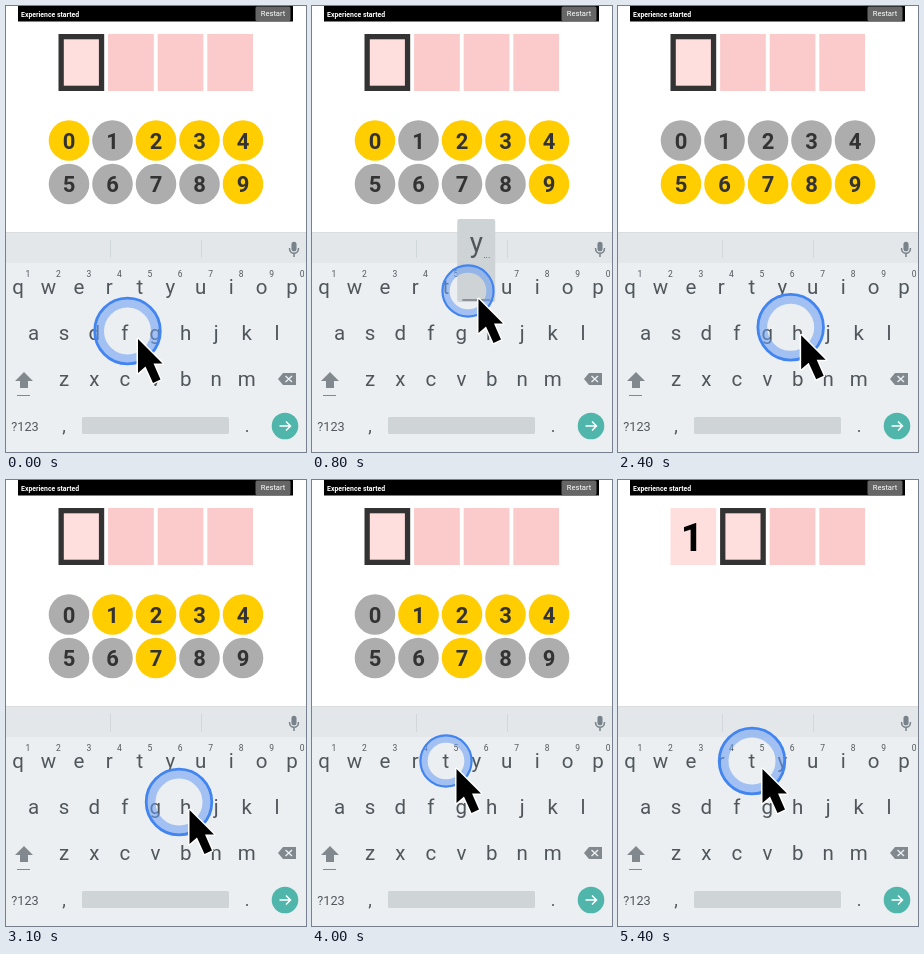
Recreate the animation shown at these times as an HTML page. Size 300x446 px, loop 7500 ms.

```html
<!DOCTYPE html>
<html lang="en">
<head>
<meta charset="utf-8">
<title>PIN entry</title>
<style>
html, body { margin: 0; width: 100%; height: 100%; overflow: hidden; background: #fff; }
svg { display: block; width: 100vw; height: 100vh; }
text { font-family: Roboto, sans-serif; }
.keys text, #popup text { fill: #50575c; }
</style>
</head>
<body>
<svg id="stage" viewBox="0 0 300 446">
  <rect x="12" width="275" height="15.500"/>
  <text x="15" y="10.700" font-size="6.900" font-weight="700" fill="#fff">Experience started</text>
  <rect x="249.500" y="0.500" width="35" height="14.500" rx="1.500" fill="#666"/>
  <text x="267" y="10.400" font-size="7.600" text-anchor="middle" fill="#fff">Restart</text>

  <g id="cells"></g>
  <text id="entered" x="74" y="70.500" font-size="39.500" font-weight="700" text-anchor="middle">1</text>
  <g id="digits"></g>

  <rect y="226" width="300" height="220" fill="#eceff1"/>
  <rect y="226" width="300" height="31" fill="#e4e7ea"/>
  <path d="M0 226.500H300" stroke="#dadde0"/>
  <path d="M104.500 234V252M195.500 234V252" stroke="#d2d7da"/>
  <g fill="none" stroke="#78828a" stroke-width="1.500">
    <rect x="286.200" y="236.500" width="3.600" height="8" rx="1.800" fill="#78828a"/>
    <path d="M283.500 242C283.500 249 292.500 249 292.500 242M288 247V251"/>
  </g>
  <g class="keys" id="keys" text-anchor="middle"></g>
  <path d="M18 366L27 375H22V382H14V375H9Z" fill="#81898e"/>
  <path d="M11 389.500H24" stroke="#81898e"/>
  <path d="M272 373L277 367H290V379H277Z" fill="#81898e"/>
  <path d="M279.500 370L286 376M286 370L279.500 376" stroke="#eceff1" stroke-width="1.400"/>
  <rect x="76" y="411" width="147" height="17" rx="1.500" fill="#cfd4d7"/>
  <circle cx="279" cy="420" r="13.300" fill="#50b5aa"/>
  <path d="M273.500 420H284.500M280 415.500L284.500 420L280 424.500" fill="none" stroke="#fff" stroke-width="1.500"/>

  <g id="popup">
    <rect x="-19" y="-75" width="38" height="83" rx="2" fill="#ced3d6"/>
    <path d="M-14 6H14" stroke="#777d81" stroke-width="1.500"/>
    <text id="popupKey" y="-42" font-size="28" text-anchor="middle"></text>
    <text x="7" y="-36" font-size="9">...</text>
  </g>

  <g id="pointer">
    <g id="ring" fill="none">
      <circle r="28" stroke="#669df5" stroke-opacity=".55" stroke-width="9"/>
      <circle r="32.800" stroke="#4285f0" stroke-width="2.800"/>
    </g>
    <path d="M10.500 8V42L18 35.500L25.500 52L33 48.500L26 32.500H35Z" stroke="#fff"
      stroke-width="3" stroke-linejoin="round" paint-order="stroke"/>
  </g>
</svg>
<script>
const LOOP = 7500, FRAME = 100;
const byId = id => document.getElementById(id);

function add(parent, tag, attributes, content = '') {
  const node = document.createElementNS('http://www.w3.org/2000/svg', tag);
  for (const name in attributes) node.setAttribute(name, attributes[name]);
  node.textContent = content;
  parent.append(node);
  return node;
}

const keyPlaces = {};
function addKeyRow(letters, x, y) {
  [...letters].forEach((letter, i) => {
    const place = { x: x + i * 30.45, y };
    keyPlaces[letter] = place;
    add(byId('keys'), 'text', { ...place, 'font-size': 20.5 }, letter);
  });
}
addKeyRow('qwertyuiop', 12, 288);
addKeyRow('asdfghjkl', 27.5, 334);
addKeyRow('zxcvbnm', 58, 380);
[...'1234567890'].forEach((digit, i) =>
  add(byId('keys'), 'text', { x: 22 + i * 30.45, y: 271, 'font-size': 8.5 }, digit));
add(byId('keys'), 'text', { x: 19, y: 424.5, 'font-size': 12.7 }, '?123');
add(byId('keys'), 'text', { x: 58, y: 426, 'font-size': 18 }, ',');
add(byId('keys'), 'text', { x: 241, y: 426, 'font-size': 18 }, '.');

const cells = [0, 1, 2, 3].map(() => add(byId('cells'), 'rect', { stroke: '#333' }));

const discs = Array.from({ length: 10 }, (_, i) => {
  const x = 63 + i % 5 * 43.5, y = i < 5 ? 134.5 : 178;
  const disc = add(byId('digits'), 'circle', { cx: x, cy: y, r: 20.3 });
  add(byId('digits'), 'text', {
    x, y: y + 8, 'font-size': 22, 'font-weight': 700, 'text-anchor': 'middle', fill: '#333'
  }, i);
  return disc;
});

// Which digits are yellow from each moment on
const rounds = [[0, '02349'], [1300, '56789'], [3000, '12347']];
const finished = 4900;
const moves = [
  { start: 0, end: 600, from: [121.5, 325], to: [156, 285] },
  { start: 1850, end: 2450, from: [156, 285], to: [173, 322] },
  { start: 3300, end: 3900, from: [173, 322], to: [134, 281] }
];
// The ring is fully pressed at each of these moments
const presses = [
  { key: 'y', at: 700 },
  { key: 'h', at: 2600 },
  { key: 't', at: 4000 }
];

const clamp = v => Math.max(0, Math.min(1, v));
const ease = v => v * v * (3 - 2 * v);

function drawCells(active) {
  cells.forEach((cell, i) => {
    const border = i === active ? 5.3 : 0;
    const box = {
      x: 52.5 + i * 49.6 + border / 2, y: 28 + border / 2,
      width: 45.7 - border, height: 57 - border,
      fill: i <= active ? '#ffdede' : '#fbcaca',
      'stroke-width': border
    };
    for (const name in box) cell.setAttribute(name, box[name]);
  });
}

function draw(time) {
  const done = time >= finished;
  drawCells(done ? 1 : 0);
  byId('entered').style.display = done ? '' : 'none';
  byId('digits').style.display = done ? 'none' : '';
  const yellow = rounds.filter(([start]) => time >= start).pop()[1];
  discs.forEach((disc, i) =>
    disc.setAttribute('fill', yellow.includes(i) ? '#ffcd00' : '#adadad'));

  const move = moves.filter(m => time >= m.start).pop();
  const progress = ease(clamp((time - move.start) / (move.end - move.start)));
  const [x, y] = move.from.map((v, i) => v + (move.to[i] - v) * progress);
  byId('pointer').setAttribute('transform', `translate(${x} ${y})`);

  const squeeze = Math.max(...presses.map(({ at }) =>
    Math.min(clamp((time - at + 150) / 150), clamp((at + 450 - time) / 200))));
  byId('ring').setAttribute('transform', `scale(${1 - 0.22 * squeeze})`);

  const pressed = presses.find(({ at }) => time >= at + 100 && time < at + 350);
  byId('popup').style.display = pressed ? '' : 'none';
  if (pressed) {
    const place = keyPlaces[pressed.key];
    byId('popup').setAttribute('transform', `translate(${place.x} ${place.y})`);
    byId('popupKey').textContent = pressed.key;
  }
}

const start = performance.now();
function tick() {
  const time = (performance.now() - start) % LOOP;
  draw(Math.floor(time / FRAME) * FRAME);
  requestAnimationFrame(tick);
}
tick();
</script>
</body>
</html>
```
